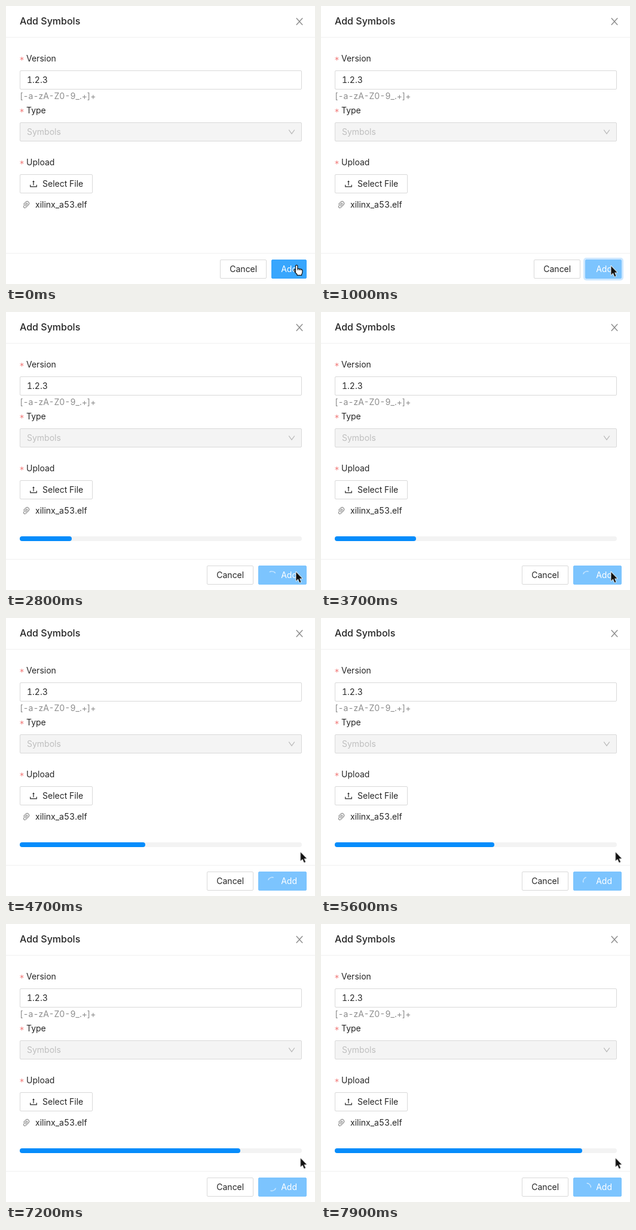
Recreate the animation shown at these times as an HTML page. Size 517 by 466 pixels, loop 8000 ms.

```html
<!DOCTYPE html>
<html lang="en">
<head>
<meta charset="utf-8">
<title>Add Symbols</title>
<style>
  html, body { margin: 0; width: 100%; height: 100%; overflow: hidden; background: #fff; }
  body {
    position: relative;
    font: 14px/22px Inter, "Noto Sans", sans-serif;
    font-variant-numeric: tabular-nums;
    color: #262626;
    white-space: nowrap;
    cursor: default;
  }
  body * { box-sizing: border-box; }
  svg { display: block; overflow: visible; }
  .at { position: absolute; left: 23px; }
  .rule { position: absolute; left: 0; right: 0; height: 1px; background: #f0f0f0; }
  h1 { margin: 0; font-size: 16px; font-weight: 500; }
  .muted { color: #8c8c8c; }

  .label { padding-left: 11px; }
  .label::before {
    content: "*";
    position: absolute; left: 0; top: 1.5px;
    font-family: "DejaVu Sans", sans-serif;
    color: #f0706f;
  }

  .field, .btn { height: 32px; border: 1px solid #d9d9d9; border-radius: 2px; background: #fff; }
  .field { width: 472px; padding: 4px 11px; }
  .off { background: #f4f4f4; color: #bfbfbf; }
  .btn { display: flex; align-items: center; padding: 0 15px; }
  .gap { margin-right: 8px; }

  .track { top: 376px; width: 472px; height: 8px; border-radius: 4px; background: #f3f3f3; animation: show 8s step-end infinite; }
  .fill { height: 8px; border-radius: 4px; background: #068cfb; animation: fill 8s infinite; }

  .foot { position: absolute; top: 425px; right: 14px; display: flex; gap: 8px; }
  .add { position: relative; color: #fff; animation: load 8s step-end infinite; }
  .add::after {
    content: "";
    position: absolute; inset: -1px;
    border-radius: 2px;
    animation: wave 8s step-end infinite;
  }
  .slot { width: 0; overflow: visible; animation: slot 8s step-end infinite; }
  .spin { animation: spin 1s steps(10) infinite; }

  .cursor { position: absolute; left: 0; top: 0; }
  .hand { animation: hand 8s step-end infinite; }
  .arrow { animation: arrow 8s step-end infinite; }

  @keyframes show { 0% { opacity: 0; } 15%, 100% { opacity: 1; } }

  /* upload progress, redrawn every 100 ms */
  @keyframes fill {
    0% { width: 0; animation-timing-function: step-end; }
    17.5% { width: 0; animation-timing-function: steps(3); }
    21.25% { width: 13px; animation-timing-function: steps(3); }
    25% { width: 36px; animation-timing-function: steps(6); }
    32.5% { width: 75px; animation-timing-function: steps(9); }
    43.75% { width: 131px; animation-timing-function: steps(2); }
    46.25% { width: 136px; animation-timing-function: steps(7); }
    55% { width: 185px; animation-timing-function: steps(3); }
    58.75% { width: 210px; animation-timing-function: steps(6); }
    66.25% { width: 249px; animation-timing-function: steps(9); }
    77.5% { width: 302px; animation-timing-function: steps(3); }
    81.25% { width: 324px; animation-timing-function: steps(6); }
    88.75% { width: 362px; animation-timing-function: steps(8); }
    98.75%, 100% { width: 414px; }
  }

  @keyframes load {
    0% { background: #38a6fd; border-color: #38a6fd; }
    11.25%, 100% { background: #7cc4fe; border-color: #7cc4fe; }
  }
  @keyframes slot {
    0% { width: 0; opacity: 0; }
    12.5% { width: 2px; opacity: 0; }
    13.75% { width: 11px; opacity: .5; }
    15% { width: 19px; opacity: .85; }
    16.25%, 100% { width: 22px; opacity: 1; }
  }
  @keyframes wave {
    0% { box-shadow: none; }
    11.25% { box-shadow: 0 0 0 1px rgba(24, 144, 255, .2); }
    12.5% { box-shadow: 0 0 1px 3px rgba(24, 144, 255, .22); }
    13.75% { box-shadow: 0 0 1px 4px rgba(24, 144, 255, .09); }
    15% { box-shadow: 0 0 1px 4px rgba(24, 144, 255, .04); }
    17.5%, 100% { box-shadow: none; }
  }
  @keyframes spin { from { transform: rotate(38deg); } to { transform: rotate(398deg); } }
  @keyframes hand { 0% { opacity: 1; } 12.5%, 100% { opacity: 0; } }
  @keyframes arrow {
    0% { opacity: 0; transform: translate(485px, 435.5px); }
    12.5% { opacity: 1; transform: translate(485px, 435.5px); }
    48.75% { opacity: 1; transform: translate(485px, 435.5px); animation-timing-function: steps(4); }
    53.75%, 100% { opacity: 1; transform: translate(492.5px, 392px); }
  }
</style>
</head>
<body>
  <h1 class="at" style="top:14px">Add Symbols</h1>
  <svg class="at" style="left:485px;top:20px" width="12" height="12" fill="none" stroke="#8c8c8c" stroke-width="1.4">
    <path d="M.8 .2 11.2 11.8M11.2 .2 .8 11.8"/>
  </svg>
  <div class="rule" style="top:52px"></div>

  <div class="at label" style="top:77px">Version</div>
  <div class="at field" style="top:108px">1.2.3</div>
  <div class="at muted" style="top:140px">[-a-zA-Z0-9_.+]+</div>

  <div class="at label" style="top:164px">Type</div>
  <div class="at field off" style="top:195px">Symbols</div>
  <svg class="at" style="left:472px;top:205px" width="12" height="12" fill="none" stroke="#b8b8b8" stroke-width="1.1">
    <path d="M1.2 2.7 6 9.2 10.8 2.7"/>
  </svg>

  <div class="at label" style="top:251px">Upload</div>
  <div class="at btn" style="top:282px">
    <svg class="gap" width="14" height="14" viewBox="64 64 896 896" fill="#262626">
      <path d="M394 318H474V664H550V318H630L512 160ZM138 626h76v162h596V626h76v238H138z"/>
    </svg>
    <span>Select File</span>
  </div>
  <svg class="at" style="left:27px;top:326px" width="14" height="14" viewBox="64 64 896 896" fill="none" stroke="#8c8c8c" stroke-width="72">
    <path d="M200 484 462 222A206 206 0 0 1 754 512L445 822A138 138 0 0 1 250 628L514 364A69 69 0 0 1 612 460L397 678"/>
  </svg>
  <div class="at" style="left:49px;top:322px">xilinx_a53.elf</div>

  <div class="at track"><div class="fill"></div></div>

  <div class="rule" style="top:414px"></div>
  <div class="foot">
    <div class="btn">Cancel</div>
    <div class="btn add">
      <div class="slot">
        <svg class="spin" width="14" height="14" fill="none" stroke="#fff" stroke-linecap="round">
          <path d="M7 .5A6.5 6.5 0 0 1 13.5 7"/>
        </svg>
      </div>
      <span>Add</span>
    </div>
  </div>

  <svg class="cursor hand" width="517" height="466" fill="#fff" stroke="#111" stroke-width="1.2" stroke-linejoin="round">
    <path d="M484.5 445.5V436a1.7 1.7 0 0 1 3.4 0v4.2l5.6.9q2.6.5 2.5 3l-.3 3.4q-.2 1.3-1 2v1.8h-7.7v-1.6q-3.6-2.8-5-6.2c-.6-1.8 1-2.4 2-1.2z"/>
    <path d="M487.9 440v3M490.6 440.8v2.4M493.2 441.2v2.2" stroke-width="1"/>
  </svg>
  <svg class="cursor arrow" width="12" height="20" fill="#111" stroke="#fff" stroke-width="1.6" stroke-linejoin="round" paint-order="stroke">
    <path d="M.4 .4V15.2L3.7 12.1 6.3 18 8.6 17 6.1 11.2H10.6Z"/>
  </svg>
</body>
</html>
```
